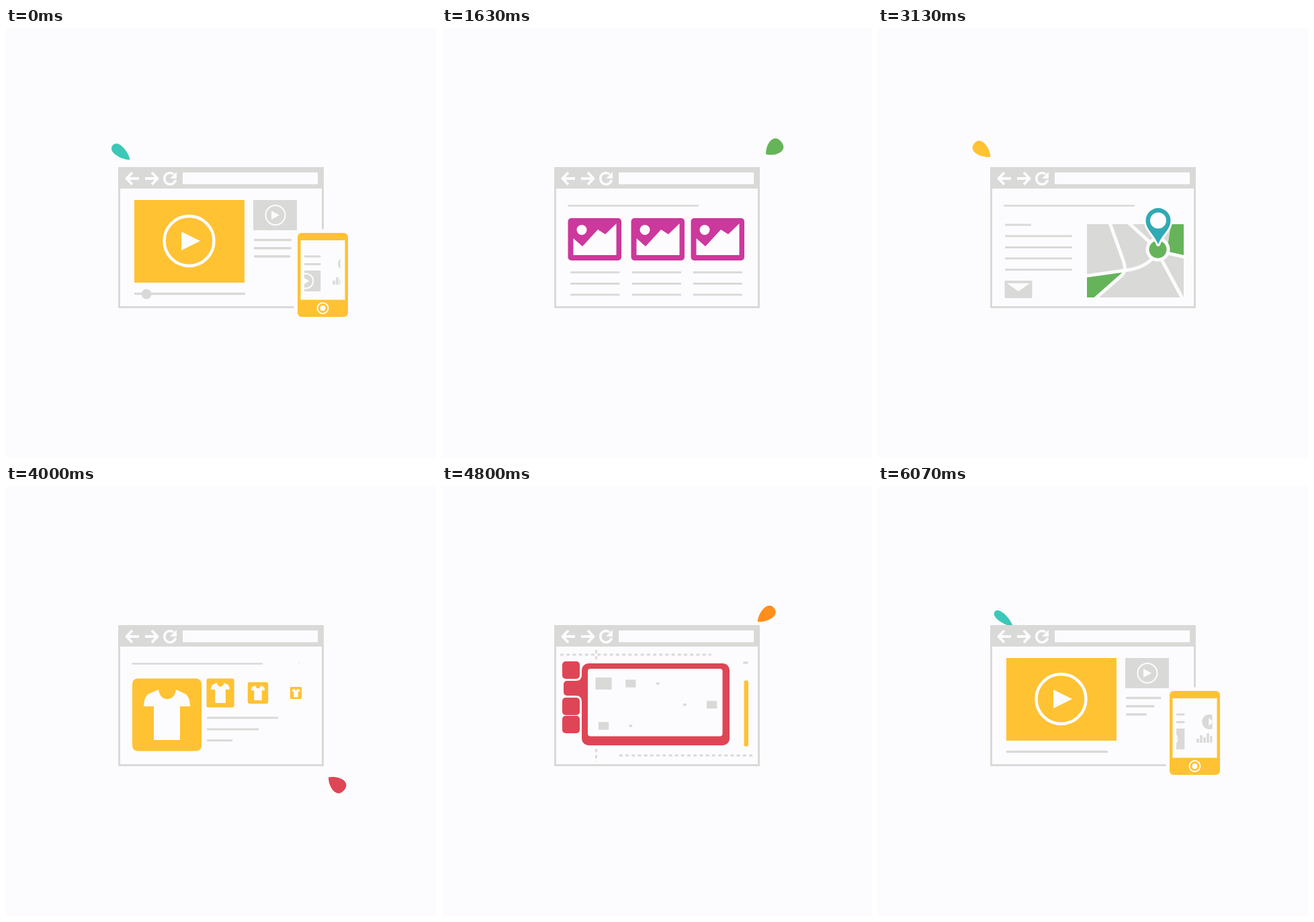
These frames come from a looping animation (640 px wide and 640 px high, 6.11 s). An HTML page with a canvas:

```html
<!DOCTYPE html>
<html lang="en">
<head>
<meta charset="utf-8">
<title>Web pages</title>
<style>
html, body { margin: 0; width: 100%; height: 100%; overflow: hidden; background: #fcfcfe }
canvas { display: block }
</style>
</head>
<body>
<canvas id="stage" width="640" height="640"></canvas>
<script>
const g = document.getElementById('stage').getContext('2d');
const LOOP = 6110, TAU = Math.PI * 2;
const WHITE = '#fcfcfe', GREY = '#d9d9d8', GOLD = '#ffc233', TEAL = '#3cc8b8', PURPLE = '#cc389c',
  GREEN = '#66b45a', SEA = '#30aab4', RED = '#de4656', ORANGE = '#ff8f1c';
let t = 0;

const clamp = v => Math.max(0, Math.min(1, v));
const out = p => 1 - (1 - clamp(p)) ** 3;
const since = a => (t - a + LOOP) % LOOP;

function grow(a, b, d) {
  const age = since(a), life = (b - a + LOOP) % LOOP;
  return age < life ? clamp(Math.min(age / d, (life - age) / 90)) : 0;
}
function box(x, y, w, h, color, r = 0) {
  g.fillStyle = color;
  g.beginPath();
  g.roundRect(x, y, w, h, r);
  g.fill();
}
function disc(x, y, r, color) {
  g.fillStyle = color;
  g.beginPath();
  g.arc(x, y, r, 0, TAU);
  g.fill();
}
function ring(x, y, r, width, color = WHITE) {
  g.strokeStyle = color;
  g.lineWidth = width;
  g.beginPath();
  g.arc(x, y, r, 0, TAU);
  g.stroke();
}
function shape(d, color) {
  g.fillStyle = color;
  g.fill(new Path2D(d));
}
function stroke(d, color, width, cap = 'butt') {
  g.strokeStyle = color;
  g.lineWidth = width;
  g.lineCap = cap;
  g.lineJoin = 'round';
  g.stroke(new Path2D(d));
}
function scaled(x, y, k, draw) {
  if (k <= 0) return;
  g.save();
  g.translate(x, y);
  g.scale(k, k);
  g.translate(-x, -y);
  draw();
  g.restore();
}
const pop = (a, b, d, x, y, draw) => scaled(x, y, grow(a, b, d), draw);
function rule(x1, x2, y, a, b, d, h = 3) {
  const w = (x2 - x1) * out(grow(a, b, d));
  if (w > 0) box(x1, y - h / 2, w, h, GREY, 1);
}

function browser() {
  box(167, 207, 306, 210, GREY);
  box(170, 239, 300, 175, WHITE);
  box(263, 215, 201, 17.5, WHITE);
  stroke('M198 224H180M188 215L179.500 224L188 233M207 224H225M217 215L225.500 224L217 233', WHITE, 4);
  stroke('M249.500 217.500A8.500 8.500 0 1 0 252.500 226', WHITE, 3.5);
  shape('M254 214V224H244Z', WHITE);
}

function video() {
  const end = 960;
  g.save();
  const r = Math.max(0, t < 1000 ? (t - 640) * 1.03 : 0);
  const hole = new Path2D();
  hole.rect(0, 0, 640, 640);
  hole.arc(320, 322, r, 0, TAU);
  g.clip(hole, 'evenodd');
  pop(5930, end, 110, 273, 317, () => {
    box(191, 256, 164, 123, GOLD);
    ring(272.5, 317, 37, 4.5);
    shape('M261 303L289 317L261 331Z', WHITE);
  });
  pop(5960, end, 90, 401, 278, () => {
    box(368, 256, 65, 45, GREY);
    ring(401, 278.5, 14.5, 2);
    shape('M395 272L407 278.500L395 285Z', WHITE);
  });
  [6017, 6037, 6050].forEach((a, i) => rule(369, 425, 315.5 + i * 12.3, a, end, 90, 3.5));
  rule(191, 356, 395.5, 6015, end, 100, 3.5);
  pop(6075, end, 32, 209, 396, () => disc(209, 396, 7.5, GREY));
  g.restore();
}

function typography() {
  const r = (t - 725) * 1.03;
  if (r > 0 && t < 2020) {
    g.save();
    g.beginPath();
    g.arc(320, 322, r, 0, TAU);
    g.clip();
    for (let row = 0; row < 8; row++)
      for (const x of [191, 282.5, 373.5])
        rule(x, x + 73.5, 280.5 + row * 16.65, 640, row < 5 ? 1240 : 2020, 1);
    g.restore();
  }
  pop(570, 1180, 120, 320, 322, () => {
    disc(320, 322, 30, WHITE);
    stroke('M306 335.500L320 305.500L335.500 335.500M312 329H330', TEAL, 11, 'round');
    shape('M320.500 311L325 323H316Z', WHITE);
  });
  const p = (t - 630) / 560;
  if (p <= 0 || p >= 1) return;
  const inner = 180 * p ** .757, outer = 180 * out(p);
  for (let i = 0; i < 8; i++) {
    const c = Math.cos(i * TAU / 8), s = Math.sin(i * TAU / 8);
    stroke(`M${320 + c * inner} ${324 + s * inner}L${320 + c * outer} ${324 + s * outer}`, TEAL, 4, 'round');
  }
}

function gallery() {
  [0, 94, 183].forEach((dx, i) => pop(1100 + i * 60, 2040 + i * 30, 150, 227 + dx, 314, () => {
    g.translate(dx, 0);
    box(187.5, 283, 79.5, 63, PURPLE, 5);
    shape('M195.500 313L209 325L232 300L243 307L259.500 291V338H195.500Z', WHITE);
    disc(208, 300.5, 7.5, WHITE);
  }));
}

function map() {
  const end = 3560;
  [228, 289, 289, 289, 289].forEach((x, i) => rule(189, x, 293 + i * 16.7, 2090 + i * 40, end, 200));
  pop(2260, end, 120, 209, 389, () => {
    box(188.5, 376, 41, 26, GREY, 1);
    shape('M192 380H226L209 392Z', WHITE);
  });
  pop(2020, end, 160, 383, 346, () => {
    box(311, 292, 144, 109, GREY);
    shape('M311 370L366 363L323 401H311Z', GREEN);
    shape('M436 292H455V339L430 334Z', GREEN);
    g.save();
    g.beginPath();
    g.rect(311, 292, 144, 109);
    g.clip();
    stroke('M345 290L365 346Q370 360 364 367L322 404', WHITE, 5);
    stroke('M309 369L366 361Q397 358 411 340M373 290L408 322M430 335L457 341M421 343L454 404', WHITE, 5);
    g.restore();
    disc(416.5, 329.5, 18, WHITE);
    disc(416.5, 329.5, 13, GREEN);
  });
  pop(2800, end, 150, 417, 322, () => {
    const pin = 'M417 322C411 307 398.500 300 398.500 286.500A18.500 18.500 0 0 1 435.500 286.500C435.500 300 423 307 417 322Z';
    stroke(pin, WHITE, 6);
    shape(pin, SEA);
    disc(417, 286.5, 12, WHITE);
  });
}

function shirtCard() {
  box(188, 286.5, 103, 108, GOLD, 8);
  shape('M227 303C229 322 251 322 253 303L268 310Q274 316 274 328H259V378H220V328H205Q205 316 211 310Z', WHITE);
}
function shop() {
  const end = 4420;
  pop(3550, end, 160, 239.5, 340, shirtCard);
  [[319, 3820], [375, 3868], [431.5, 3926]].forEach(([x, a]) => pop(a, end, 180, x, 308, () => {
    g.translate(x, 308);
    g.scale(.4, .4);
    g.translate(-239.5, -340.5);
    shirtCard();
  }));
  [3908, 3943, 3976].forEach((a, i) => rule(299, 440, 345 + i * 16.9, a, end, 250));
  pop(3985, end, 150, 436, 263, () => disc(436, 263, 8, GREY));
}

function tabs() {
  const end = 5240, k = grow(4400, end, 150);
  if (!k) return;
  const across = out((t - 4500) / 640) * k;
  g.setLineDash([5, 4.2]);
  stroke(`M176 251H${176 + 264 * across}M462 401H${462 - 234 * across}M229.500 244V${244 + 166 * clamp(across * 1.2)}`, GREY, 3);
  g.setLineDash([]);
  [[179, 261], [179, 315], [179, 342]].forEach(([x, y], i) => pop(4480 + i * 40, end, 120, x + 13, y + 13,
    () => box(x, y, 26, 26, RED, 5)));
  scaled(318, 325, k, () => {
    box(205, 261, 226, 128, WHITE, 12);
    box(181, 290, 36, 22, RED, 5);
    box(208, 264, 220, 122, RED, 10);
    box(217, 272, 200.5, 100.5, WHITE, 4);
    shape('M199 290Q208 290 208 281V290ZM199 312Q208 312 208 321V312Z', RED);
  });
  for (let row = 0; row < 3; row++)
    for (let i = 0; i < 5; i++) {
      const x = 240.5 + 40.3 * (row === 1 ? 4 - i : i), y = 294 + row * 31.5;
      pop(4650 + (i + (row ? 1 : 0)) * 62, end, 140, x, y, () => box(x - 12, y - 9, 24, 18, GREY));
    }
  const h = 98 * grow(4640, end, 130);
  box(449.5, 338.5 - h / 2, 6.5, h, GOLD, 2);
  pop(4760, end, 110, 452, 263, () => box(442, 258, 20, 10, GREY, 2));
}

function dashboard() {
  const end = 5960;
  rule(188, 382, 264, 5250, end, 200);
  pop(5240, end, 150, 245, 335, () => {
    disc(245, 335, 48, GREY);
    shape('M245 335V287A48 48 0 0 1 286.600 359Z', ORANGE);
    disc(245, 335, 20, WHITE);
  });
  [45, 72, 56, 92, 66].forEach((height, i) => {
    const h = height * out(grow(5280 + i * 40, end, 220));
    box(322 + i * 20, 386 - h, 13, h, ORANGE);
  });
  rule(316, 421, 390, 5260, end, 180);
}

function phone() {
  const k = grow(5480, 710, 150);
  scaled(471.5, 367, k, () => {
    box(428.5, 299.5, 86, 136, WHITE, 10);
    box(434, 305, 75, 125, GOLD, 6);
    box(438.5, 316, 66, 88.5, WHITE);
    ring(471.5, 417, 8, 2);
    disc(471.5, 417, 4, WHITE);
    g.save();
    g.beginPath();
    g.rect(444, 320, 53.5, 80);
    g.clip();
    const slide = Math.min(53, Math.max(0, since(5480) - 550) * .3);
    g.translate(slide, 0);
    disc(481, 351, 11, GREY);
    shape('M480 345L487 351L480 357Z', WHITE);
    [6, 11, 8, 14, 10].forEach((h, i) => box(462 + i * 5, 382 - h, 3.5, h, GREY));
    g.translate(-53, 0);
    box(444, 338.5, 53, 3, GREY);
    box(444, 350, 53, 3, GREY);
    box(444, 361, 53, 31, GREY);
    ring(475, 376.5, 11, 2);
    shape('M471 371L480 376.500L471 382Z', WHITE);
    g.restore();
  });
  if (t > 700 && t < 860) {
    const y = (t - 770) * .3, f = Math.min(1, (860 - t) / 90);
    [[444, 401, 17], [498, 391, 22], [485, 364, 10]].forEach(([x, top, h]) =>
      box(x - 1.5, top + y, 3, h * f, GREY, 1));
  }
}

// colour, start, horizontal and vertical side, drop of the arc
const blobs = [
  [TEAL, 6012, 1, 1, 4], [PURPLE, 520, -1, -1, 5], [GREEN, 1440, -1, 1, 15], [SEA, 2230, 1, -1, 30],
  [GOLD, 2980, 1, 1, 16], [RED, 3820, -1, -1, 18], [ORANGE, 4660, -1, 1, 32], [GOLD, 5380, 1, -1, 10]
];
function blob([color, start, sx, sy, drop], front) {
  const u = since(start) / 570, v = 1 - u;
  if (u >= 1 || (u > .45) !== front) return;
  const curve = (a, b, c, d) => v ** 3 * a + 3 * v * v * u * b + 3 * v * u * u * c + u ** 3 * d;
  const m = clamp((u - .08) / .36), a = 18 - 4.5 * m, b = 5.5 + 7 * m;
  g.save();
  g.translate(320, 312);
  g.scale(sx, sy);
  g.translate(curve(215, 120, 80, 320) - 320, curve(225, 120 + drop, 165 + drop, 322) - 312);
  // points outwards, then turns over for the way back
  g.rotate(-2.45 - 3.2 * clamp((u - .4) / .4));
  shape(`M${-a} 0C${-a * .4} ${-b * 1.15} ${a} ${-b * 1.7} ${a} 0C${a} ${b * 1.7} ${-a * .4} ${b * 1.15} ${-a} 0Z`, color);
  g.restore();
}

function frame(now) {
  t = now % LOOP;
  g.fillStyle = WHITE;
  g.fillRect(0, 0, 640, 640);
  blobs.forEach(b => blob(b, false));
  browser();
  video();
  typography();
  rule(187, 382.5, 264.5, 1130, 4420, 160, 2.5);
  [gallery, map, shop, tabs, dashboard, phone].forEach(draw => draw());
  blobs.forEach(b => blob(b, true));
  requestAnimationFrame(frame);
}
requestAnimationFrame(frame);
</script>
</body>
</html>
```
